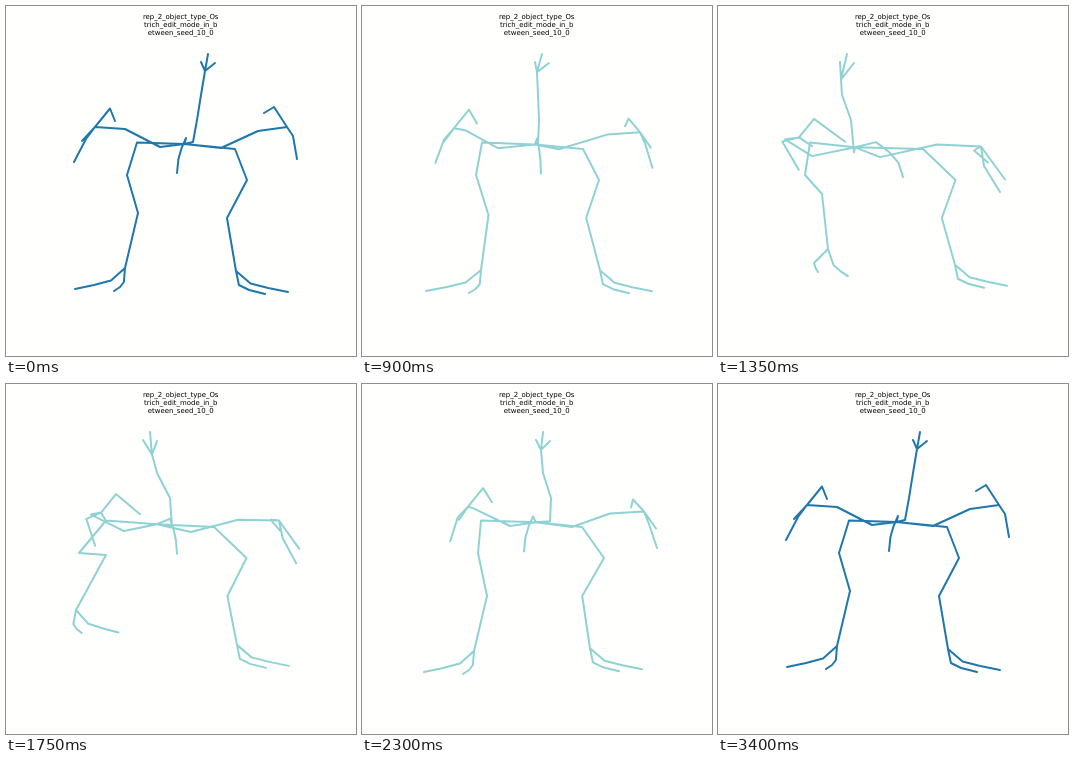
An HTML page that plays this animation: 350 px wide and 350 px high, repeating every 3.45 s.

```html
<!DOCTYPE html>
<html lang="en">
<head>
<meta charset="utf-8">
<title>Skeleton motion</title>
<style>
  html, body { margin: 0; width: 100%; height: 100%; overflow: hidden; background: #fffffd; }
  svg { display: block; width: 350px; height: 350px; }
  path { fill: none; stroke-width: 2; stroke-linecap: round; stroke-linejoin: round; }
  text { font: 6.94px "DejaVu Sans", sans-serif; text-anchor: middle; fill: #000; }
</style>
</head>
<body>
<svg viewBox="0 0 350 350">
  <text x="174.7" y="12.6">rep_2_object_type_Os</text>
  <text x="174.7" y="20.8">trich_edit_mode_in_b</text>
  <text x="174.7" y="29">etween_seed_10_0</text>
  <path id="bones"/>
</svg>
<script>
const LOOP = 3450, STEP = 50, MOVE_START = 800, MOVE_END = 2550;

// Poses: rest, lean, turn, kick, land; then back to rest.
const times = [750, 900, 1350, 1750, 2300, 2550];

// Horizontal positions per pose, unless noted; heights follow from rules below.
const tracks = {
  torso: [178.5, 173, 137, 151, 174],
  neckBase: [187, 176, 136, 166, 188],
  neckMid: [191, 177, 133, 164, 189],
  neckTop: [195, 176, 124, 151, 181],
  skull: [199, 175, 123, 146, 179],
  crown: [202, 180, 129, 144, 181],
  tailTop: [180, 175, 158, 164, 171],
  tailTip: [171, 179, 185, 171, 162],
  shoulderL: [154, 136, 94, 118, 148],
  elbowL: [119, 103, 67, 85, 112],
  wristL: [89, 92, 81, 95, 106],
  spreadL: [0, 3, 26, 19, 4],       // how far the fingers swing round
  shoulderR: [215, 197, 162, 185, 210],
  wristR: [281, 278, 263, 273, 282],
  spreadR: [0, 8, 30, 24, 10],
  hipL: [131, 120, 92, 100, 119],
  kneeL: [121, 114, 87, 73, 116],
  ankleL: [132, 126.5, 104, 100, 125],
  footL: [119, 119, 110, 70, 112],
  footLY: [262, 264, 243, 226, 267],
  toeL: [-1, -1.1, 0.4, 0.85, -1],  // facing: -1 left, 1 right
  hipR: [229, 221, 205, 208, 220],
  footR: [230, 238, 237, 231, 228]
};

// Smooth cubic through the poses, at rest on both ends.
function sample(track, time) {
  const last = times.length - 1;
  const value = i => track[i % last];
  const slope = i => i === 0 || i === last ? 0 :
    (value(i + 1) - value(i - 1)) / (times[i + 1] - times[i - 1]);
  let i = 0;
  while (i < last - 1 && time >= times[i + 1]) i++;
  const span = times[i + 1] - times[i];
  const u = (time - times[i]) / span, v = 1 - u;
  return value(i) * v * v * (1 + 2 * u) + value(i + 1) * u * u * (1 + 2 * v) +
    span * u * v * (slope(i) * v - slope(i + 1) * u);
}

const from = ([x, y]) => (dx, dy) => [x + dx, y + dy];

function fingersL(wrist, s) {
  const at = from(wrist);
  return [
    [wrist, at(15, -18.5), at(20 + s, -6 + 0.4 * s)],
    [wrist, at(-13 + s, 14 - 0.2 * s)],
    [wrist, at(-9 - 0.3 * s, 12 - 0.3 * s), at(-21 + 0.8 * s, 35 - 0.1 * s)]
  ];
}

function fingersR(wrist, s) {
  const at = from(wrist);
  return [
    [wrist, at(-13 + 0.2 * s, -20 + 0.8 * s), at(-23 + s, -14 + s)],
    [wrist, at(6 + 0.6 * s, 9 + 0.8 * s)],
    [wrist, at(6 - 0.1 * s, 9 + 0.35 * s), at(10 + 0.3 * s, 32 + 0.45 * s)]
  ];
}

// A long and a short toe; a foot facing the viewer droops and splays.
function toes(foot, facing, reach) {
  const at = from(foot), front = Math.max(0, 1 - Math.abs(facing));
  const long = [[14, 12.5], [31, 17], [50, 21]];
  const short = [[0.1, 14], [0.45, 19], [1, 23]];
  return [
    [foot, ...long.map(([x, y]) => at(x * facing, y * (1 + front / 2)))],
    [foot, ...short.map(([x, y]) => at(x * reach * facing - 24 * front, y))]
  ];
}

function skeleton(time) {
  const p = {};
  for (const name in tracks) p[name] = sample(tracks[name], time);
  const turn = tracks.torso[0] - p.torso;
  const sway = p.footR - tracks.footR[0];

  const torso = [p.torso, 138 + 0.08 * turn];
  const skull = [p.skull, 65 + 0.2 * turn];
  const wristL = [p.wristL, 121 + 0.4 * p.spreadL];
  const wristR = [p.wristR, 121 + 0.65 * p.spreadR];
  const elbowR = from(wristR)(-29 - 0.5 * p.spreadR, 4 - 0.2 * p.spreadR);
  const footL = [p.footL, p.footLY];
  const footR = [p.footR, 265 - 0.15 * turn];
  const shoulderY = 141 + 0.22 * turn;

  const tailTopY = 132 + 0.1 * turn;
  const tail = [0, 0.28, 0.6, 1].map(k => [
    p.tailTop + (p.tailTip - p.tailTop) * (1 - (1 - k) ** 2),
    tailTopY + 35 * k
  ]);

  return [
    [torso, [p.neckBase, 136 + 0.25 * turn], [p.neckMid, 114], [p.neckTop, 89], skull, [p.crown, 48]],
    [[p.crown - 7, 56], skull, [p.crown + 7, 57]],
    [torso, ...tail],
    [torso, [p.shoulderL, shoulderY], [p.elbowL, wristL[1] + 2], wristL],
    [torso, [p.shoulderR, shoulderY + 1], elbowR, wristR],
    ...fingersL(wristL, p.spreadL),
    ...fingersR(wristR, p.spreadR),
    [torso, [p.hipL, 136.5], [p.kneeL, 169], [p.ankleL, p.footLY - 55], footL],
    [torso, [p.hipR, 143], [241 - 0.5 * sway, 174], [221 + 0.4 * sway, 212], footR],
    ...toes(footL, p.toeL, 11),
    ...toes(footR, 1.04, 28)
  ];
}

const outline = chains => chains.map(chain =>
  "M" + chain.map(point => point.map(c => c.toFixed(2)).join(" ")).join("L")).join("");

const bones = document.getElementById("bones");

function draw(now) {
  const time = Math.floor(now % LOOP / STEP) * STEP;
  const moving = time >= MOVE_START && time < MOVE_END;
  bones.setAttribute("d", outline(skeleton(moving ? time : times[0])));
  bones.setAttribute("stroke", moving ? "#90d2d4" : "#1f77ac");
}

const start = performance.now();
function tick() {
  draw(performance.now() - start);
  requestAnimationFrame(tick);
}
tick();
</script>
</body>
</html>
```
